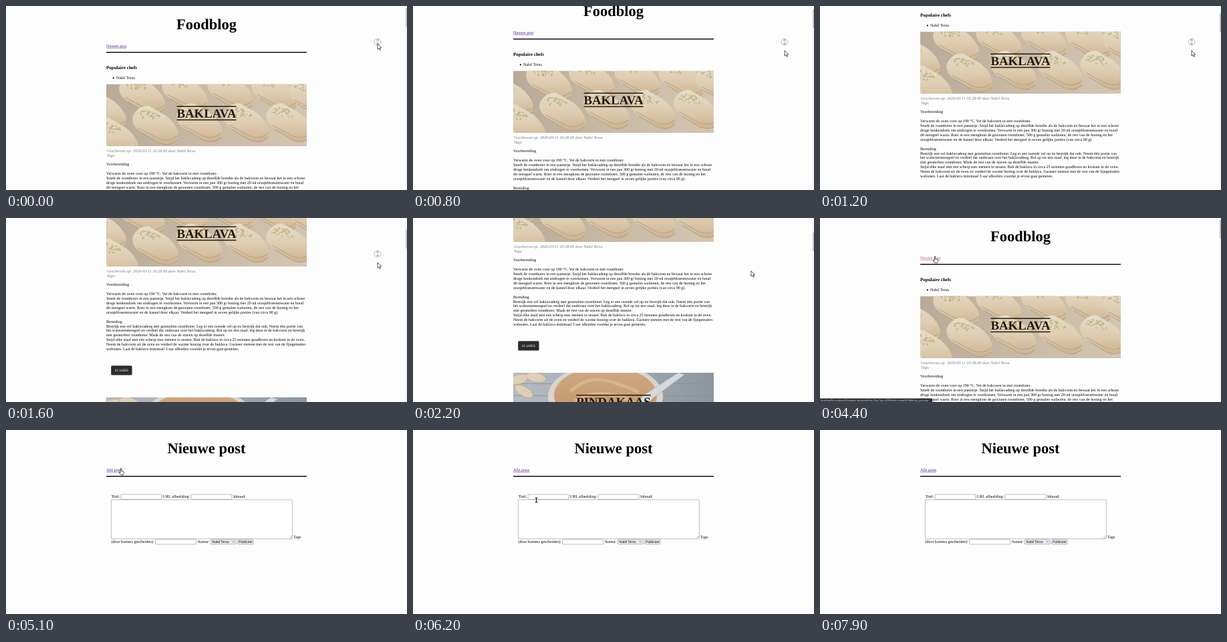
Write an HTML page that moves like this. It is 600 px wide and 277 px high and loops after 8 s.

```html
<!DOCTYPE html>
<html lang="nl">
<head>
<meta charset="utf-8">
<title>Foodblog</title>
<style>
  html, body { margin: 0; width: 100%; height: 100%; overflow: hidden; background: #fdfdfe; }
  svg { display: block; width: 100vw; height: 100vh; }
  text { font: 6px "Liberation Serif", "Times New Roman", serif; text-rendering: geometricPrecision; white-space: pre; }
  .h1 { font-size: 22.5px; font-weight: bold; text-anchor: middle; }
  .h3 { font-size: 7.02px; font-weight: bold; }
  .meta { font-style: italic; fill: #777; }
  .link { fill: #551a8b; text-decoration: underline; }
  .hover { fill: #a5657f; }
  .dish { font-size: 18.75px; font-weight: bold; text-anchor: middle; fill: #24180b; }
  .ui { font: 5px "Liberation Sans", Arial, sans-serif; }
  .field { fill: #fff; stroke: #8f8f9d; stroke-width: .6; }
  .button { fill: #e9e9ed; stroke: #8f8f9d; stroke-width: .6; }
</style>
</head>
<body>
<svg id="stage" viewBox="0 0 600 277"></svg>
<script>
const LOOP = 8000, STEP = 100;
const CHEF = 'Nabil Tersu';
const LINE = 6.9;

const recipe = `Voorbereiding

Verwarm de oven voor op 190 °C. Vet de bakvorm in met roomboter.
Smelt de roomboter in een pannetje. Snijd het baklavadeeg op dezelfde breedte als de bakvorm en bewaar het in een schone
droge keukendoek om uitdrogen te voorkomen. Verwarm in een pan 300 gr honing met 20 ml oranjebloesemwater en houd
dit mengsel warm. Roer in een mengkom de gezouten roomboter, 500 g gemalen walnoten, de rest van de honing en het
oranjebloesemwater en de kaneel door elkaar. Verdeel het mengsel in zeven gelijke porties (van circa 90 g).

Bereiding
Bestrijk een vel baklavadeeg met gesmolten roomboter. Leg er een tweede vel op en bestrijk dat ook. Neem één portie van
het walnotenmengsel en verdeel dat onderaan over het baklavadeeg. Rol op tot een staaf, leg deze in de bakvorm en bestrijk
met gesmolten roomboter. Maak de rest van de staven op dezelfde manier.
Snijd elke staaf met een scherp mes meteen in zessen. Bak de baklava in circa 25 minuten goudbruin en krokant in de oven.
Neem de bakvorm uit de oven en verdeel de warme honing over de baklava. Garneer meteen met de rest van de fijngemalen
walnoten. Laat de baklava minimaal 3 uur afkoelen voordat je ervan gaat genieten.`.split('\n');

const text = (x, y, s, cls = '') => `<text x="${x}" y="${y}" class="${cls}">${s}</text>`;
const rect = (x, y, w, h, attrs) => `<rect x="${x}" y="${y}" width="${w}" height="${h}" ${attrs}/>`;
const path = (d, attrs) => `<path d="${d}" ${attrs}/>`;
const field = (x, y, w, h, cls = 'field') => rect(x, y, w, h, `rx=".8" class="${cls}"`);
const header = (title, link, id = '') =>
  text(300, 35.2, title, 'h1') +
  `<g id="${id}">${text(150, 61.8, link, 'link')}</g>` +
  rect(150, 69, 300, 1.4, 'fill="#000"');

let seed = 7;
const random = () => (seed = seed * 16807 % 2147483647) / 2147483647;

function crumbs(cx, cy) {
  let s = '';
  for (let i = 0; i < 38; i++) {
    const a = random() * 2 * Math.PI, r = Math.sqrt(random());
    const x = cx + Math.cos(a) * r * 17, y = cy + Math.sin(a) * r * 7 + Math.cos(a) * r * 3;
    s += `<circle cx="${x.toFixed(1)}" cy="${y.toFixed(1)}" r="${(.6 + random()).toFixed(1)}"/>`;
  }
  return `<g fill="#b5ab72" opacity=".75">${s}</g>`;
}

function baklava() {
  const pieces = [[-40, 8], [18, -16], [82, -20], [150, -22], [216, -20], [272, -12],
                  [-22, 48], [38, 30], [104, 26], [174, 26], [238, 26], [-60, 62]];
  return rect(0, 0, 300, 93.5, 'fill="url(#tray)"') + pieces.map(([x, y]) =>
    `<g transform="translate(${x} ${y})">` +
    path('M2 18Q10 2 26 3L52 18Q68 32 70 44L68 54Q56 66 40 58L14 42Q-2 32 2 18Z', 'fill="url(#pastry)"') +
    path('M14 42L40 58Q56 66 68 54M10 36L40 52Q56 58 68 48', 'fill="none" stroke="#b39a7b" stroke-width="1.2" opacity=".7"') +
    crumbs(26, 17) + '</g>').join('');
}

function peanutButter() {
  const nut = (x, y, r) => `<ellipse cx="${x}" cy="${y}" rx="15" ry="7" transform="rotate(${r} ${x} ${y})" fill="#ddcfb8" stroke="#bda98c" stroke-width=".7"/>`;
  const planks = [16, 34, 54, 76].map(y => rect(0, y, 300, .8, 'fill="#88919a"')).join('');
  return rect(0, 0, 300, 93.5, 'fill="url(#wood)"') + planks +
    nut(8, 10, -15) + nut(34, 7, 12) + nut(16, 28, 30) + nut(38, 54, -20) + nut(270, 62, -25) +
    '<ellipse cx="138" cy="36" rx="86" ry="50" fill="#d9d4cd"/>' +
    '<ellipse cx="138" cy="34" rx="77" ry="43" fill="url(#butter)"/>' +
    path('M86 28Q112 2 148 14T188 30M92 42Q130 20 180 44', 'fill="none" stroke="#dfc09c" stroke-width="5" opacity=".6"') +
    path('M247 0L198 32Q184 42 190 47Q199 50 209 38L256 3Z', 'fill="#d5d8dc" stroke="#b0b5bb" stroke-width=".6"');
}

function post(y, name, half, art) {
  const bar = dy => rect(300 - half, y + dy, half * 2, 1.5, 'fill="#24180b"');
  return `<g transform="translate(150 ${y})" clip-path="url(#photo)">${art}</g>` +
    bar(33) + bar(53.2) + text(300, y + 50, name, 'dish');
}

const gradient = (id, stops, dir = 'x2="0" y2="1"') => `<linearGradient id="${id}" ${dir}>` +
  stops.map((c, i) => `<stop offset="${i / (stops.length - 1)}" stop-color="${c}"/>`).join('') + '</linearGradient>';

const defs = `<defs><clipPath id="photo">${rect(0, 0, 300, 93.5, '')}</clipPath>` +
  gradient('tray', ['#b9aa99', '#c9baa6', '#d3c5b2'], '') +
  gradient('pastry', ['#e6dcca', '#dfcdb2', '#cdb291']) +
  gradient('wood', ['#b5bbc0', '#a5acb3', '#8d959d'], '') +
  gradient('butter', ['#cfa982', '#c1946a']) + '</defs>';

const blog = `<g id="blog"><g id="page">` +
  header('Foodblog', 'Nieuwe post', 'newPost') +
  text(150, 95.4, 'Populaire chefs', 'h3') +
  '<circle cx="160.8" cy="108.4" r="1.1"/>' + text(165, 110, CHEF) +
  post(117.5, 'BAKLAVA', 44.5, baklava()) +
  text(151, 220.3, `Geschreven op: 2020-03-11 10:28:00 door ${CHEF}`, 'meta') +
  text(151, 227.4, 'Tags:', 'meta') +
  recipe.map((s, i) => text(150, (240.4 + i * LINE).toFixed(1), s)).join('') +
  rect(157.2, 360.3, 31.4, 14.2, 'rx="1.6" fill="#2c2c2c"') +
  `<text x="172.9" y="369.2" class="ui" style="font-size:4.8px;fill:#fff;text-anchor:middle">21 LIKES</text>` +
  post(408, 'PINDAKAAS', 55.7, peanutButter()) + '</g>' +
  rect(598, 0, 2, 277, 'fill="#f2f2f3"') +
  rect(598, 3, 2, 28, 'id="thumb" fill="#c3c3c5"') + '</g>';

const form = `<g id="form">` + header('Nieuwe post', 'Alle posts') +
  text(157.4, 102.4, 'Titel:') + field(172, 97, 61, 7.2) +
  text(234.8, 102.4, 'URL afbeelding:') + field(277, 97, 61, 7.2) +
  text(340, 102.4, 'Inhoud:') +
  field(157.4, 105, 271, 58.8) + path('M424 163L428 159M426 163L428 161', 'stroke="#777" stroke-width=".5"') +
  text(430, 162.6, 'Tags') +
  text(157.4, 170.2, '(door komma gescheiden):') + field(223.6, 164.7, 61, 7.3) +
  text(286.4, 170.2, 'Auteur:') + field(306.3, 164.7, 38, 7.3, 'button') +
  text(308.6, 170.1, CHEF, 'ui') + path('M339 167.5L340.4 169L341.8 167.5', 'fill="none" stroke="#222" stroke-width=".6"') +
  field(346.6, 164.7, 23.4, 7.3, 'button') + text(348.2, 170.1, 'Publiceer', 'ui') + '</g>';

const status = `<g id="status">` + rect(0, 271.6, 168, 5.4, 'fill="#303033"') +
  `<text x="1" y="275.6" class="ui" style="font-size:3.7px;fill:#e4e4e4">localhost/Bit academy/Database advanced/Lets-Play-Top-v10f09efefe-4cfaaf1675b0/new_post.php</text></g>`;

const scrollMark = `<g id="scrollMark"><circle cx="556" cy="54" r="4.9" fill="#fff" stroke="#999" stroke-width=".7"/>` +
  path('M554.3 52.4L556 50.5L557.7 52.4M554.3 55.6L556 57.5L557.7 55.6', 'fill="none" stroke="#333" stroke-width=".8"') +
  '<circle cx="556" cy="54" r=".6" fill="#333"/></g>';

const cursor = `<g id="cursor">` +
  path('M0 0V8.2L1.9 6.5L3.2 9.4L4.6 8.8L3.3 6H5.8Z', 'id="arrow" fill="#fff" stroke="#111" stroke-width=".7"') +
  path('M-.8 0Q0 -.8 .8 0V3.6L4 4.5Q4.6 5 4.4 6.5L3.6 9.5H-.6L-2.8 6.2Q-2.6 5 -.8 6.2Z', 'id="hand" fill="#fff" stroke="#111" stroke-width=".7"') +
  path('M-2 -3.4H2M0 -3.4V3.4M-2 3.4H2', 'id="beam" fill="none" stroke="#111" stroke-width="1"') + '</g>';

document.getElementById('stage').innerHTML = defs + blog + form + status + scrollMark + cursor;
const el = id => document.getElementById(id);
const show = (id, on) => el(id).style.display = on ? '' : 'none';

const scrollTrack = [[300, 0], [500, 3], [800, 20], [1600, 138], [1850, 175], [3350, 175], [3600, 0]];
const cursorTrack = [[300, 556, 57], [700, 556, 67], [2000, 556, 67], [2900, 158.5, 167], [3300, 158.5, 167],
                     [4100, 172, 58], [5200, 172, 58], [5900, 184.5, 105.5], [6700, 184.5, 105.5], [7200, 190, -12]];

const linear = p => p;
const smooth = p => p * p * (3 - 2 * p);

// Interpolates the values of a [time, ...values] table at time t.
function sample(track, t, ease) {
  const next = track.findIndex(k => k[0] > t);
  if (next < 0) return track.at(-1).slice(1);
  if (next === 0) return track[0].slice(1);
  const [a, b] = [track[next - 1], track[next]];
  const p = ease((t - a[0]) / (b[0] - a[0]));
  return a.slice(1).map((v, i) => v + (b[i + 1] - v) * p);
}

function draw(t) {
  const [scroll] = sample(scrollTrack, t, linear);
  const [x, y] = sample(cursorTrack, t, smooth);
  const onForm = t >= 4700;
  const hand = t >= 4000 && t < 5300;
  const beam = t >= 5800 && t < 6800;

  el('page').setAttribute('transform', `translate(0 ${-scroll})`);
  el('thumb').setAttribute('y', 3 + scroll * .108);
  el('newPost').firstChild.classList.toggle('hover', hand);
  show('blog', !onForm);
  show('form', onForm);
  show('status', hand && !onForm);
  show('scrollMark', t < 1900);
  el('cursor').setAttribute('transform', `translate(${x} ${y})`);
  show('hand', hand);
  show('beam', beam);
  show('arrow', !hand && !beam);
}

const start = performance.now();
function tick() {
  const t = (performance.now() - start) % LOOP;
  draw(Math.floor(t / STEP) * STEP);
  requestAnimationFrame(tick);
}
tick();
</script>
</body>
</html>
```
